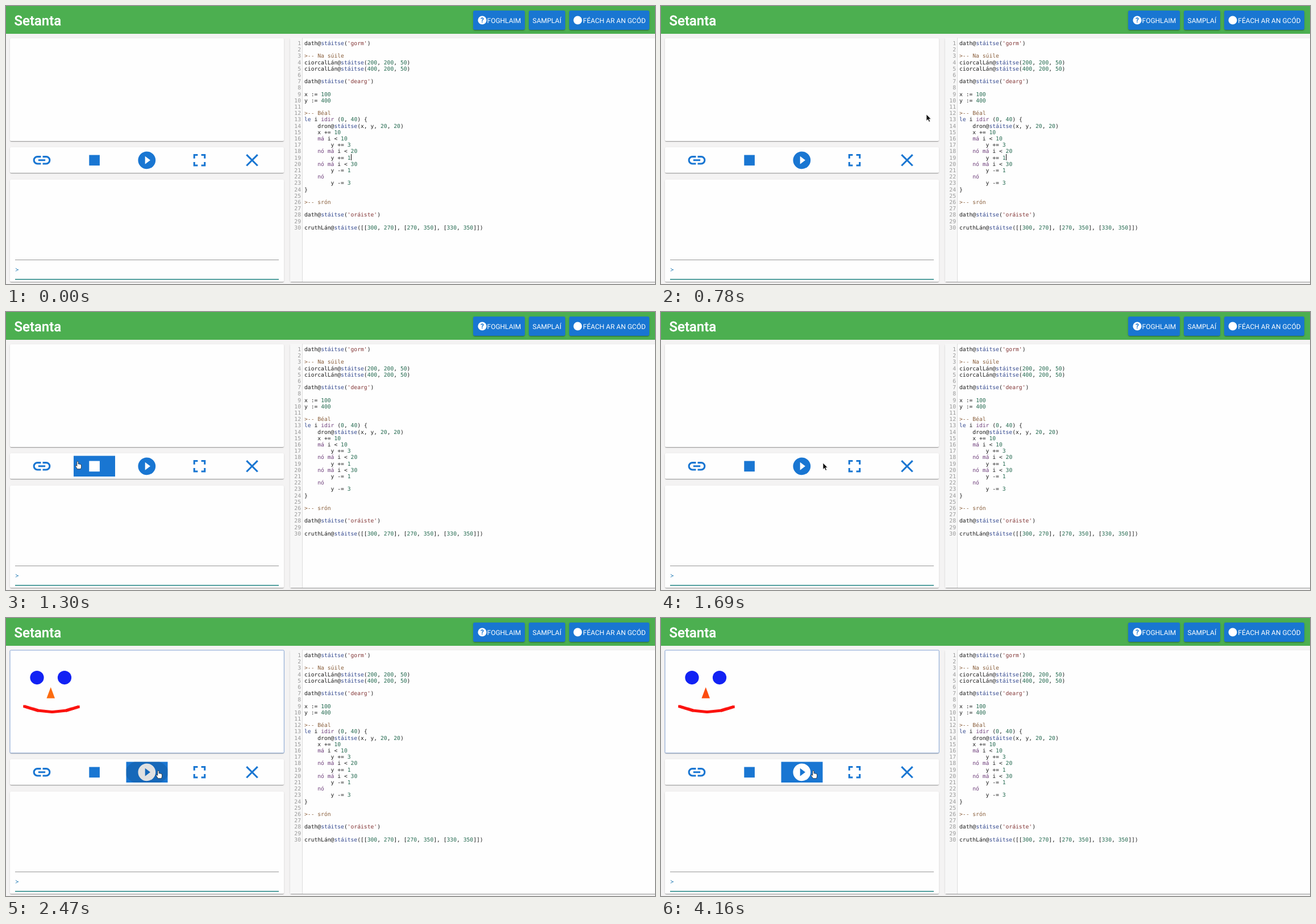
Animation, 1142 px wide and 490 px high, one loop 4420 ms. Source, as an HTML page:

```html
<!DOCTYPE html>
<html lang="ga">
<head>
<meta charset="utf-8">
<title>Setanta</title>
<style>
html, body { margin: 0; width: 100%; height: 100%; overflow: hidden; background: #f4f3f3; }
#app { position: relative; width: 1142px; height: 490px; overflow: hidden; background: #f4f3f3; }
#app > div, #app > svg { position: absolute; }
.bar { left: 0; top: 0; width: 1142px; height: 49px; background: #4caf50; }
.card { background: #fefefe; border-radius: 2px;
  box-shadow: 0 2px 1px -1px rgba(0,0,0,.2), 0 1px 1px rgba(0,0,0,.14), 0 1px 3px rgba(0,0,0,.12); }
.btn { top: 7.5px; height: 34.5px; background: #1976d2; border-radius: 3px;
  box-shadow: 0 2px 1px -1px rgba(0,0,0,.2), 0 1px 2px rgba(0,0,0,.14), 0 1px 4px rgba(0,0,0,.12); }
.gutter { left: 500px; top: 56px; width: 21px; height: 430px; background: #f7f7f7; border-right: 1px solid #ddd; }
svg { left: 0; top: 0; }
text { text-rendering: geometricPrecision; }
.ui { font: 400 12px Roboto, sans-serif; fill: #fff; }
.title { font: 500 24px Roboto, sans-serif; fill: #fff; stroke: #fff; stroke-width: .35px; }
#code text { font: 9.69px "DejaVu Sans Mono", monospace; white-space: pre; }
#code { fill: #1c1c1c; }
.num { fill: #999; text-anchor: end; }
.n { fill: #23694f; }
.s { fill: #833636; }
.c { fill: #8a5f3c; }
.k { fill: #70407c; }
.b { fill: #34498f; }
.tool { color: #1976d2; }
.tool .bg { fill: #1976d2; visibility: hidden; }
.icon { fill: currentColor; }
.line { fill: none; stroke: currentColor; stroke-width: 2; }

#caret, #stop .icon, #stop .bg, #play .icon, #play .bg, #ripple, #drawing, #nose, #mouse, #arrow, #hand {
  animation-duration: 4420ms; animation-iteration-count: infinite; animation-timing-function: step-end; }
#caret { animation-name: blink; }
#stop .bg { animation-name: stopBg; }
#stop .icon { animation-name: stopIcon; }
#play .bg { animation-name: playBg; }
#play .icon { animation-name: playIcon; }
#ripple { animation-name: ripple; transform-origin: 248px 272px; }
#drawing { animation-name: draw; }
#nose { animation-name: nose; }
#mouse { animation-name: move; }
#arrow { animation-name: arrow; }
#hand { animation-name: hand; }

@keyframes blink {
  0%, 14.705%, 41.176% { visibility: visible; }
  2.941%, 26.470%, 52.941%, 100% { visibility: hidden; }
}
@keyframes stopBg {
  0%, 35.294%, 100% { visibility: hidden; }
  26.470% { visibility: visible; }
}
@keyframes stopIcon {
  0%, 35.294%, 100% { color: #1976d2; }
  26.470% { color: #fff; }
}
@keyframes playBg {
  0%, 38.235% { visibility: hidden; }
  35.294%, 44.117%, 100% { visibility: visible; }
}
@keyframes playIcon {
  0%, 38.235% { color: #1976d2; }
  35.294%, 44.117%, 100% { color: #fff; }
}
@keyframes ripple {
  0%, 61.764%, 100% { opacity: 0; transform: scale(.5); }
  52.941% { opacity: .12; transform: scale(.5); }
  55.882% { opacity: .12; transform: scale(1); }
  58.823% { opacity: .06; transform: scale(1.4); }
}
@keyframes draw {
  0% { visibility: hidden; }
  55.882%, 100% { visibility: visible; }
}
@keyframes nose {
  0% { fill: #fc6c10; }
  61.764%, 100% { fill: #fc4c10; }
}
@keyframes move {
  0%, 14.705% { transform: translate(492px, 185px); }
  17.647% { transform: translate(467px, 191px); }
  20.588% { transform: translate(392px, 209px); }
  23.529% { transform: translate(288px, 238px); }
  26.470% { transform: translate(178px, 260px); }
  29.411% { transform: translate(126px, 263px); }
  32.352% { transform: translate(168px, 264px); }
  35.294% { transform: translate(236px, 265px); }
  38.235% { transform: translate(285px, 266px); }
  41.176% { transform: translate(290px, 267px); }
  44.117% { transform: translate(276px, 268px); }
  47.058%, 100% { transform: translate(268px, 269px); }
}
@keyframes arrow {
  0%, 26.470%, 44.117%, 100% { visibility: hidden; }
  14.705%, 38.235% { visibility: visible; }
}
@keyframes hand {
  0%, 38.235% { visibility: hidden; }
  26.470%, 44.117%, 100% { visibility: visible; }
}
</style>
</head>
<body>
<div id="app">
  <div class="bar"></div>
  <div class="btn" style="left:822px;width:91px"></div>
  <div class="btn" style="left:920px;width:64px"></div>
  <div class="btn" style="left:991px;width:141px"></div>
  <div class="card" style="left:7px;top:57px;width:482px;height:181px"></div>
  <div class="card" style="left:7px;top:249px;width:482px;height:45px"></div>
  <div class="card" style="left:7px;top:306px;width:482px;height:180px"></div>
  <div class="card" style="left:500px;top:57px;width:650px;height:429px"></div>
  <div class="gutter"></div>

  <svg width="1142" height="490" viewBox="0 0 1142 490">
    <text class="title" x="14.5" y="34">Setanta</text>
    <g class="ui">
      <circle cx="838" cy="25" r="7.6"/>
      <text x="838" y="29.4" text-anchor="middle" style="font-weight:700;fill:#1976d2">?</text>
      <text x="846.5" y="29.8">FOGHLAIM</text>
      <text x="926.5" y="29.8">SAMPLAÍ</text>
      <circle cx="1006" cy="25" r="7.5"/>
      <text x="1015.3" y="29.8">FÉACH AR AN GCÓD</text>
    </g>

    <g id="code"></g>
    <rect id="caret" x="607" y="261" width="1" height="11" fill="#111"/>

    <path d="M16 447.5H480" stroke="#979797"/>
    <path d="M16 481.7H480" stroke="#1f8482" stroke-width="1.6"/>
    <text x="16.5" y="468.3" style="font:10px 'DejaVu Sans Mono','DejaVu Sans',monospace;fill:#2c80b8">≻</text>

    <g id="drawing">
      <rect x="7" y="56.8" width="482.3" height="181.2" rx="1.5" fill="none" stroke="#86a5d6"/>
      <g transform="translate(6 56.5) scale(.2425)">
        <g fill="#1222f4"><circle cx="200" cy="200" r="50"/><circle cx="400" cy="200" r="50"/></g>
        <path id="mouth" fill="#fb120e"/>
        <path id="nose" d="M300 270L270 350H330Z"/>
      </g>
    </g>

    <g class="tool">
      <g class="line" transform="translate(63 271.8) scale(1.54) translate(-12 -12)">
        <path d="M11 8H7a4 4 0 0 0 0 8h4M13 8h4a4 4 0 0 1 0 8h-4M8 12h8"/>
      </g>
    </g>
    <g class="tool" id="stop">
      <rect class="bg" x="119" y="253.5" width="73" height="36.5"/>
      <rect class="icon" x="146.3" y="262.6" width="18.6" height="18.6"/>
    </g>
    <g class="tool" id="play">
      <clipPath id="box"><rect x="211.5" y="253.5" width="73" height="36.5"/></clipPath>
      <rect class="bg" x="211.5" y="253.5" width="73" height="36.5"/>
      <path class="icon" fill-rule="evenodd" transform="translate(247.8 271.8) scale(1.54)"
        d="M-10 0a10 10 0 0 1 20 0a10 10 0 0 1 -20 0zM-2 -4.5v9l6 -4.5z"/>
      <g clip-path="url(#box)"><ellipse id="ripple" cx="248" cy="272" rx="38" ry="23"/></g>
    </g>
    <g class="tool">
      <path class="line" transform="translate(340.5 271.8) scale(1.54)"
        d="M-6 -2v-4h4M2 -6h4v4M6 2v4h-4M-2 6h-4v-4"/>
      <path class="line" transform="translate(433 271.8) scale(1.54)" d="M-6.3 -6.3L6.3 6.3M6.3 -6.3L-6.3 6.3"/>
    </g>

    <g id="mouse">
      <path id="arrow" d="M0 0V11.5L2.7 9L4.6 13.3L6.6 12.4L4.8 8.2H8.2Z" fill="#111" stroke="#fff" stroke-width=".7"/>
      <path id="hand" fill="#fff" stroke="#222" stroke-width=".8" stroke-linejoin="round"
        d="M-1.2 .8Q0 -.8 1.2 .8V5Q2.3 4.2 3.2 5.3Q4.4 4.6 5.1 5.8Q6.5 5.6 6.6 7V10Q6.4 12 5.4 13.8H-.6Q-1.6 11.4 -3.6 9.2Q-4.2 7.6 -2.9 7.4Q-1.9 7.6 -1.2 8.6Z"/>
    </g>
  </svg>
</div>
<script>
const program = `dath@stáitse('gorm')

>-- Na súile
ciorcalLán@stáitse(200, 200, 50)
ciorcalLán@stáitse(400, 200, 50)

dath@stáitse('dearg')

x := 100
y := 400

>-- Béal
le i idir (0, 40) {
    dron@stáitse(x, y, 20, 20)
    x += 10
    má i < 10
        y += 3
    nó má i < 20
        y += 1
    nó má i < 30
        y -= 1
    nó
        y -= 3
}

>-- srón

dath@stáitse('oráiste')

cruthLán@stáitse([[300, 270], [270, 350], [330, 350]])`;

const code = document.getElementById('code');

function add(parent, tag, text, attrs) {
  const el = document.createElementNS('http://www.w3.org/2000/svg', tag);
  for (const key in attrs) el.setAttribute(key, attrs[key]);
  el.textContent = text;
  parent.appendChild(el);
  return el;
}

function kind(token) {
  if (token.startsWith('>--')) return 'c';
  if (token[0] === "'") return 's';
  if (/^\d/.test(token)) return 'n';
  if (token === 'stáitse' || token === 'le') return 'b';
  if (/^(idir|má|nó)$/.test(token)) return 'k';
  return '';
}

program.split('\n').forEach((line, i) => {
  const y = 69 + i * 11.2;
  add(code, 'text', i + 1, { class: 'num', x: 519, y });
  const row = add(code, 'text', '', { x: 525, y });
  const tokens = line.match(/>--.*|'[^']*'|\d+|[a-záéíóú]+|[^a-záéíóú\d']+/gi) || [];
  for (const token of tokens) add(row, 'tspan', token, { class: kind(token) });
});

// The mouth follows the loop in the program.
let x = 100, y = 400, mouth = '';
for (let i = 0; i < 40; i++) {
  mouth += `M${x} ${y}h20v20h-20z`;
  x += 10;
  y += i < 10 ? 3 : i < 20 ? 1 : i < 30 ? -1 : -3;
}
document.getElementById('mouth').setAttribute('d', mouth);
</script>
</body>
</html>
```
